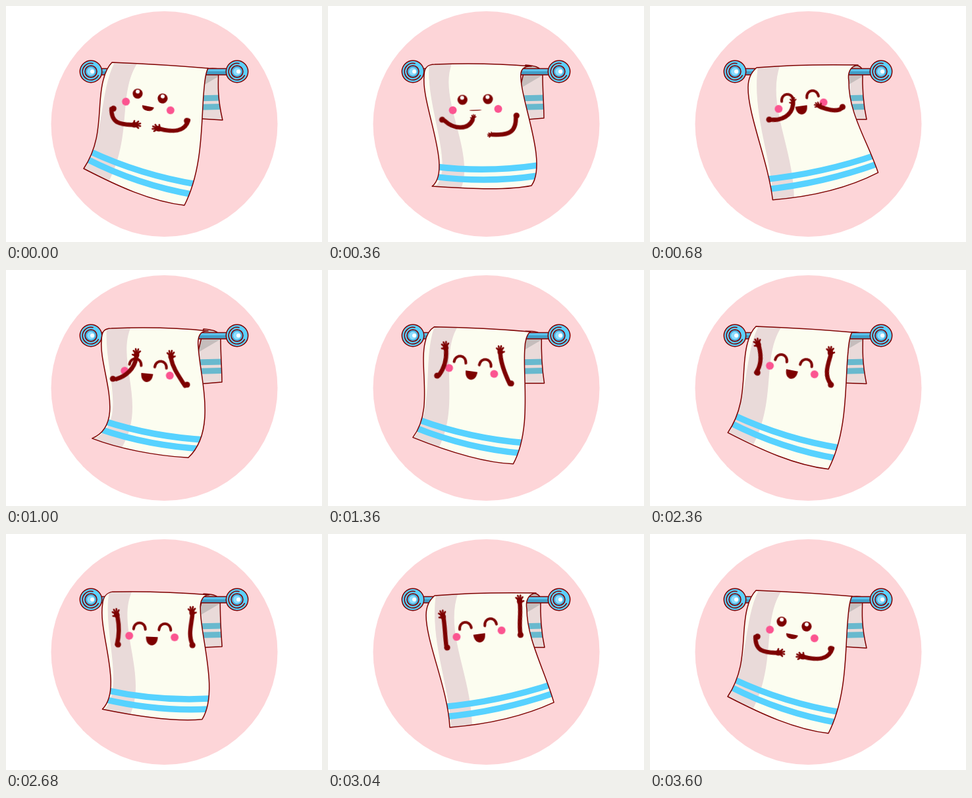
An HTML page without scripts for the animation above (3.64 s loop, 480 by 360 pixels).

```html
<!DOCTYPE html>
<html lang="en">
<head>
<meta charset="utf-8">
<title>Happy towel</title>
<style>
html, body { margin: 0; width: 100%; height: 100%; overflow: hidden; background: #fff; }
svg { display: block; width: 480px; height: 360px; }
.line { fill: none; stroke: #7d0000; stroke-width: 1.5; stroke-linejoin: round; }
.ink { fill: #7d0000; }
.arm { fill: none; stroke: #7d0000; stroke-width: 6.5; stroke-linecap: round; }

.cloth, .shade, .bands, .flap, .body, .mouth, .open, .shut, .arm, .hand {
  animation: 3.64s linear infinite;
}
/* Three 1.2 s swings, then a 40 ms rest */
.cloth { animation-name: cloth; }
.shade { animation-name: shade; }
.bands { animation-name: bands; }
.flap { animation-name: flap; }
.body { animation-name: body; }
.mouth { animation-name: mouth; }
.open { animation-name: open; animation-timing-function: step-end; }
.shut { animation-name: shut; animation-timing-function: step-end; }
.arm.l { animation-name: arm-l; }
.arm.r { animation-name: arm-r; }
.hand.l { animation-name: hand-l; }
.hand.r { animation-name: hand-r; }

@keyframes cloth {
  0%, 32.97%, 65.93%, 98.9%, 100% { animation-timing-function: cubic-bezier(.4,0,.8,.8);
    d: path("M148 112C151 100 155 92 161 86C210 88 260 91 307 95C304 100 302 113 301 125C296 170 301 245 271 304C220 298 170 275 118 248C150 200 137 150 148 112Z"); }
  9.89%, 42.86%, 75.82% {
    d: path("M146 106C146 95 150 89 162 89C210 87 262 88 309 92C297 91 291 97 293 112C295 150 333 240 309 274C270 282 205 278 158 275C190 250 141 150 146 106Z"); }
  14.29%, 47.25%, 80.22% {
    d: path("M149 122C148 108 155 98 162 94C210 90 262 88 314 90C303 92 300 100 301 112C300 150 345 215 331 261C282 279 225 290 176 292C199 240 146 165 149 122Z"); }
  17.58%, 50.55%, 83.52% { animation-timing-function: ease-out;
    d: path("M149 124C149 110 155 100 162 94C210 90 262 89 316 90C303 92 300 103 302 115C302 160 330 210 343 257C293 280 235 291 185 295C182 235 149 165 149 124Z"); }
  19.78%, 52.75%, 85.71% { animation-timing-function: ease-in-out;
    d: path("M149 124C149 110 155 100 162 94C210 90 262 89 316 90C303 92 300 103 302 115C301 165 331 205 348 253C298 280 238 292 187 296C179 240 148 165 149 124Z"); }
  27.47%, 60.44%, 93.41% { animation-timing-function: cubic-bezier(.2,.6,.4,1);
    d: path("M145 108C145 95 148 89 160 89C210 87 262 88 307 93C295 92 290 101 292 118C295 165 321 245 277 286C225 283 170 272 131 257C185 235 141 150 145 108Z"); }
}
@keyframes shade {
  0%, 32.97%, 65.93%, 98.9%, 100% { animation-timing-function: cubic-bezier(.4,0,.8,.8);
    d: path("M199 88C170 135 192 195 157 266L118 249C150 200 142 130 165 86Z"); }
  9.89%, 42.86%, 75.82% { d: path("M189 86C165 140 226 225 201 281L161 277C196 250 146 150 154 86Z"); }
  14.29%, 47.25%, 80.22% { d: path("M196 89C183 150 222 215 217 292L179 293C203 240 151 165 164 91Z"); }
  17.58%, 19.78%, 50.55%, 52.75%, 83.52%, 85.71% { animation-timing-function: ease-in-out;
    d: path("M198 89C176 150 218 215 219 294L187 297C186 235 154 165 164 91Z"); }
  27.47%, 60.44%, 93.41% { animation-timing-function: cubic-bezier(.2,.6,.4,1);
    d: path("M190 86C166 140 217 205 175 273L132 258C190 235 147 150 153 86Z"); }
}
@keyframes bands {
  0%, 32.97%, 65.93%, 98.9%, 100% { animation-timing-function: cubic-bezier(.4,0,.8,.8);
    d: path("M128 222Q205 258 290 272M122 233Q200 273 286 288"); }
  9.89%, 42.86%, 75.82% { d: path("M162 245Q245 255 326 242M160 260Q245 271 325 258"); }
  14.29%, 47.25%, 80.22% { d: path("M174 259Q256 256 340 230M174 274Q256 270 340 244"); }
  17.58%, 50.55%, 83.52% { animation-timing-function: ease-out;
    d: path("M172 264Q260 256 344 228M175 279Q262 271 348 241"); }
  19.78%, 52.75%, 85.71% { animation-timing-function: ease-in-out;
    d: path("M173 265Q261 256 349 225M176 280Q263 271 352 238"); }
  27.47%, 60.44%, 93.41% { animation-timing-function: cubic-bezier(.2,.6,.4,1);
    d: path("M147 230Q225 255 306 259M140 242Q218 269 303 273"); }
}
@keyframes flap {
  0%, 32.97%, 65.93%, 98.9%, 100% { d: path("M300 96C312 95 318 95 323 96C322 120 321 140 329 174L280 171Z"); }
  9.89%, 27.47%, 42.86%, 60.44%, 75.82%, 93.41% { d: path("M300 90C312 91 323 92 326 103C326 130 328 150 328 171L280 175Z"); }
  14.29%, 19.78%, 47.25%, 52.75%, 80.22%, 85.71% { d: path("M300 91C312 89 320 90 323 98C322 130 324 150 329 173L280 173Z"); }
}
@keyframes body {
  0%, 32.97%, 65.93%, 98.9%, 100% { animation-timing-function: cubic-bezier(.4,0,.8,.8); transform: translate(216px,152.5px) rotate(11deg); }
  9.89%, 42.86%, 75.82% { transform: translate(224px,158px) rotate(-1.6deg); }
  14.29%, 47.25%, 80.22% { transform: translate(230px,153px) rotate(-8.5deg); }
  17.58%, 19.78%, 50.55%, 52.75%, 83.52%, 85.71% { animation-timing-function: ease-in-out; transform: translate(229.5px,152px) rotate(-8.3deg); }
  27.47%, 60.44%, 93.41% { animation-timing-function: cubic-bezier(.2,.6,.4,1); transform: translate(214.5px,157.5px) rotate(6deg); }
}
@keyframes mouth {
  0%, 98.9%, 100% { transform: scaleY(.55); }
  9.89%, 12% { transform: scaleY(.12); }
  18%, 92% { transform: none; }
}
@keyframes open { 0%, 92% { opacity: 1; } 18% { opacity: 0; } }
@keyframes shut { 0%, 92% { opacity: 0; } 18% { opacity: 1; } }

/* Poses: clasp, giggle, cover eyes, then waving */
@keyframes arm-l {
  0%, 98.9%, 100% { d: path("M-54 15C-50 36 -38 36 -19 33"); }
  9.89% { d: path("M-47 16C-35 28 -13 32 -5 16"); }
  27.47% { d: path("M-46 14C-31 8 -20 -5 -19 -22"); }
  47.25% { d: path("M-51 13C-52 -6 -60 -20 -66 -30"); }
  64.84% { d: path("M-53 14C-48 3 -49 -10 -56 -25"); }
  83.52% { d: path("M-52 14C-52 -2 -50 -14 -50 -30"); }
}
@keyframes arm-r {
  0%, 98.9%, 100% { d: path("M64 10C62 28 46 32 26 31"); }
  9.89% { d: path("M61 13C61 36 50 41 26 39"); }
  27.47% { d: path("M59 13C47 -2 38 -12 34 -25"); }
  47.25% { d: path("M61 11C53 -5 48 -21 46 -36"); }
  64.84% { d: path("M62 10C48 -1 52 -20 53 -33"); }
  83.52% { d: path("M62 10C62 -8 67 -18 68 -36"); }
}
@keyframes hand-l {
  0%, 98.9%, 100% { transform: translate(-19px,33px) rotate(-11deg); }
  9.89% { transform: translate(-5px,16px) rotate(-70deg) scale(.65); }
  27.47% { transform: translate(-19px,-22px) rotate(-91deg); }
  47.25% { transform: translate(-66px,-30px) rotate(-122deg); }
  64.84% { transform: translate(-56px,-25px) rotate(-120deg); }
  83.52% { transform: translate(-50px,-30px) rotate(-97deg); }
}
@keyframes hand-r {
  0%, 98.9%, 100% { transform: translate(26px,31px) rotate(-180deg); }
  9.89% { transform: translate(26px,39px) rotate(-185deg) scale(.65); }
  27.47% { transform: translate(34px,-25px) rotate(-101deg); }
  47.25% { transform: translate(46px,-36px) rotate(-101deg); }
  64.84% { transform: translate(53px,-33px) rotate(-105deg); }
  83.52% { transform: translate(68px,-36px) rotate(-87deg); }
}
</style>
</head>
<body>
<svg viewBox="0 0 480 360">
  <defs>
    <clipPath id="front"><path class="cloth"/></clipPath>
    <clipPath id="back"><path class="flap"/></clipPath>
    <g id="knob">
      <circle class="line" r="16.7" style="fill:#5bd0fd"/>
      <circle class="line" r="12.8" stroke-dasharray="58 23" transform="rotate(25)"/>
      <circle class="line" r="9" style="fill:#49aedb"/>
      <circle r="6" fill="#8cdcfd"/>
      <circle cx="2" r="3" fill="#fff"/>
    </g>
    <g id="eye">
      <circle class="ink" r="7.6"/>
      <circle cx="-.5" cy="-3.2" r="3" fill="#fff"/>
    </g>
    <path id="lid" d="M-9 5C-8 -8 8 -8 9 5" fill="none" stroke="#7d0000" stroke-width="4" stroke-linecap="round"/>
    <g id="palm" class="ink">
      <ellipse cx="4" rx="5" ry="4.2"/>
      <path d="M4 0L10 -5M4 0L13 -2M4 0L13 2M4 0L10 5M2 0L4 -6" stroke="#7d0000" stroke-width="2.6" stroke-linecap="round"/>
    </g>
  </defs>

  <circle cx="240.5" cy="180" r="172" fill="#fdd5d8"/>

  <path class="flap" fill="#e9dad9"/>
  <g clip-path="url(#back)">
    <path d="M288 128L327 105V92H288Z" fill="#c5bdbc"/>
    <path d="M285 141L330 140M285 154.5L330 153.5" stroke="#68b9ce" stroke-width="9"/>
  </g>
  <path class="flap line"/>

  <rect x="135" y="95.5" width="210" height="9.5" fill="#5bc8f3"/>
  <rect x="135" y="99.5" width="210" height="5.5" fill="#429dc5"/>
  <path class="line" d="M135 95.5H345M135 105H345"/>
  <use href="#knob" x="129" y="100"/>
  <use href="#knob" x="351" y="100"/>

  <path class="cloth" fill="#fcfdf0"/>
  <g clip-path="url(#front)">
    <path class="shade" fill="#e9dad9"/>
    <path class="bands" fill="none" stroke="#57d2ff" stroke-width="9.5"/>
  </g>
  <path class="cloth line"/>

  <g class="body">
    <g fill="#fb5490"><circle cx="-34.5" r="6"/><circle cx="34.5" r="6"/></g>
    <g class="open"><use href="#eye" x="-19.3" y="-15.4"/><use href="#eye" x="19.3" y="-15.4"/></g>
    <g class="shut"><use href="#lid" x="-19.3" y="-15.5"/><use href="#lid" x="19.3" y="-15.5"/></g>
    <g transform="translate(0 .5)"><path class="mouth ink" d="M-9 0H9C9 8 5 13 0 13S-9 8 -9 0Z"/></g>
    <circle class="ink" cx="-51" cy="14" r="4.6"/>
    <circle class="ink" cx="62" cy="11" r="4.6"/>
    <path class="arm l"/>
    <path class="arm r"/>
    <g class="hand l"><use href="#palm"/></g>
    <g class="hand r"><use href="#palm" transform="scale(1 -1)"/></g>
  </g>
</svg>
</body>
</html>
```
